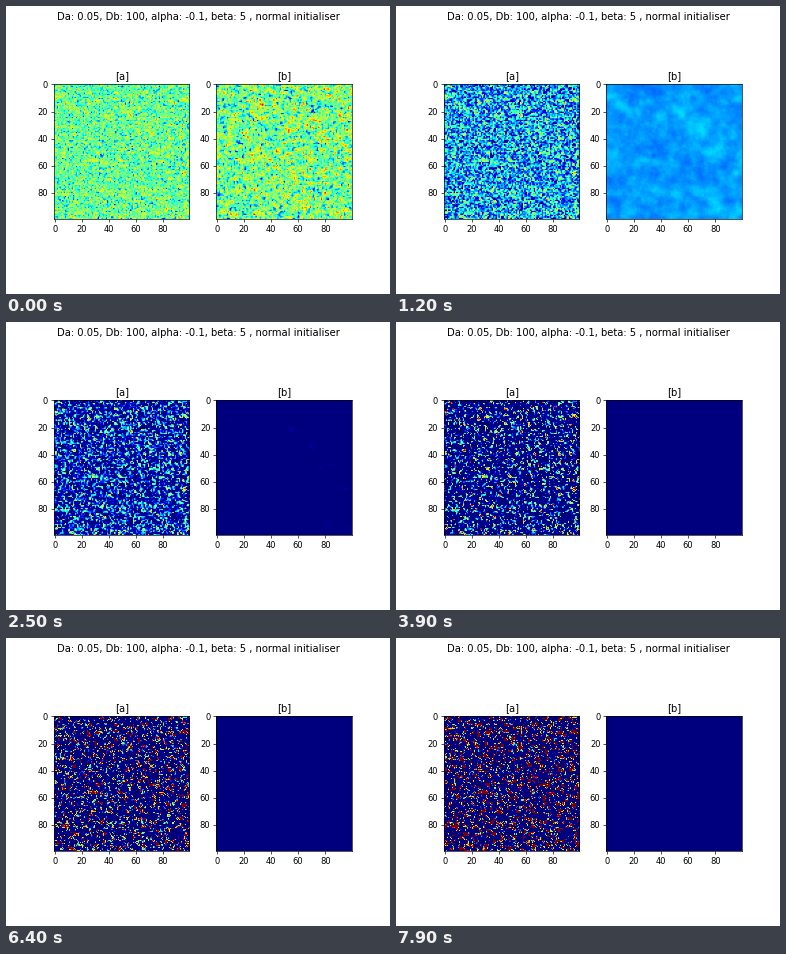
Animation of 384x288 px, one loop 8000 ms. Source, as a matplotlib script:

```python
import numpy as np
import matplotlib.pyplot as plt
from matplotlib.animation import FuncAnimation

DA, DB, ALPHA, BETA = 0.05, 100, -0.1, 5
SIZE, DT = 100, 0.001
FRAMES, INTERVAL, STEPS = 80, 100, 50


def laplacian(u):
    return (np.roll(u, 1, 0) + np.roll(u, -1, 0)
            + np.roll(u, 1, 1) + np.roll(u, -1, 1) - 4 * u)


def advance(a, b, steps):
    for _ in range(steps):
        da = DA * laplacian(a) + a - a * a * a - b + ALPHA
        db = DB * laplacian(b) + BETA * (a - b)
        a, b = a + DT * da, b + DT * db
    return a, b


def simulate():
    rng = np.random.default_rng(7)
    a, b = rng.normal(0, 0.05, (2, SIZE, SIZE))
    states = [advance(a, b, 1)]
    while len(states) < FRAMES:
        states.append(advance(*states[-1], STEPS))
    return states


states = simulate()

plt.rcParams["font.family"] = "DejaVu Sans"
fig, axes = plt.subplots(1, 2, figsize=(6.4, 4.8), dpi=60)
fig.suptitle(f"Da: {DA}, Db: {DB}, alpha: {ALPHA}, beta: {BETA} , "
             "normal initialiser")

# The colour scale stays fixed to the range of the initial state.
images = []
for ax, name, field in zip(axes, "ab", states[0]):
    ax.set_title(f"[{name}]")
    images.append(ax.imshow(field, cmap="jet", interpolation="antialiased",
                            vmin=field.min(), vmax=field.max()))


def update(frame):
    for image, field in zip(images, states[frame]):
        image.set_data(field)
    return images


anim = FuncAnimation(fig, update, frames=FRAMES, interval=INTERVAL,
                     repeat=True, repeat_delay=0)
plt.show()
```
